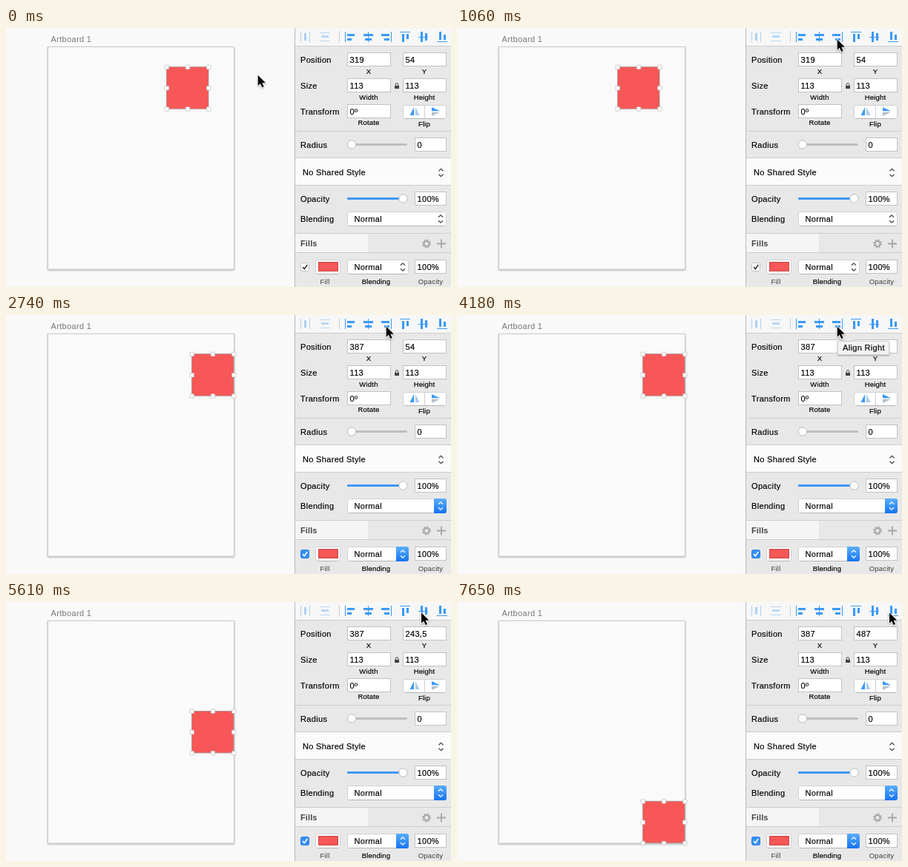
An HTML page for the animation above (8 s loop, 600 px wide and 350 px high).

```html
<!DOCTYPE html>
<html lang="en">
<head>
<meta charset="utf-8">
<title>Align tools</title>
<style>
html, body { margin: 0; width: 100%; height: 100%; overflow: hidden; background: #f9f9f9; }
svg { display: block; }
text { font: 11px "Liberation Sans", Arial, sans-serif; letter-spacing: .33px; fill: #000; stroke: #000; stroke-width: .18; white-space: pre; }
.small { font-size: 9.5px; letter-spacing: .2px; text-anchor: middle; }
.heading { font-weight: bold; fill: #444; stroke: none; letter-spacing: .1px; }
.muted { fill: #777; stroke: none; }
.dim { fill: #3c3c3c; stroke: none; }
.line { stroke: #cdcdcd; }
.box { fill: #fff; stroke: #c2c2c2; }
.button { fill: #fff; stroke: #d0d0d0; }
.knob { fill: #fdfdfd; stroke: #bdbdbd; }
.chevron { fill: none; stroke: #484848; stroke-width: 1.3; }
.cap { fill: url(#blue); visibility: hidden; }
.check { fill: none; stroke: #333; stroke-width: 1.6; }
.active .cap { visibility: visible; }
.active .cap + .chevron, .active .check { stroke: #fff; }
.active .tick { fill: #3390f8; stroke: #2b7fe0; }
.icon { fill: #3b99f5; }
.icon.pressed { fill: #16324f; }
</style>
</head>
<body>
<svg id="stage" width="600" height="350" viewBox="0 0 600 350"></svg>
<script>
const stage = document.getElementById('stage');
const LOOP = 8000;

const rect = (x, y, w, h, attrs = '') => `<rect x="${x}" y="${y}" width="${w}" height="${h}" ${attrs}/>`;
const text = (x, y, s, attrs = '') => `<text x="${x}" y="${y}" ${attrs}>${s}</text>`;
const small = (x, y, s, cls = '') => text(x, y, s, `class="small ${cls}"`);
const path = (d, attrs = '') => `<path d="${d}" ${attrs}/>`;
const field = (x, y, w, value, id) =>
  rect(x + .5, y + .5, w - 1, 18, 'class="box"') + text(x + 3.5, y + 14, value, id ? `id="${id}"` : '');
const button = (x, y, w, h) =>
  rect(x + .5, y + .5, w - 1, h - 1, 'rx="3" class="button"') +
  path(`M${x + 3} ${y + h - .5}h${w - 6}`, 'stroke="#b4b4b4"');
const rule = y => path(`M390 ${y + .5}H600`, 'class="line"');
const knob = (x, y) => `<circle cx="${x}" cy="${y}" r="5.7" class="knob"/>`;
const chevrons = (x, y) =>
  path(`M${x - 3} ${y - 2.2}l3 -3 3 3M${x - 3} ${y + 2.2}l3 3 3 -3`, 'class="chevron"');
const popup = (x, y, w) =>
  button(x, y, w, 20) +
  path(`M${x + w - 17} ${y}h14a3 3 0 0 1 3 3v14a3 3 0 0 1 -3 3h-14z`, 'class="cap"') +
  chevrons(x + w - 8, y + 10) + text(x + 9.5, y + 14, 'Normal');
// Each bar is [x, y, width, height]
const icon = (bars, attrs = '') =>
  `<g class="icon" ${attrs}>${bars.map(b => rect(...b)).join('')}</g>`;

function toolbar() {
  return rect(390, 0, 210, 24, 'fill="#f7f7f7"') + rule(24) +
    path('M449.5 4V20', 'class="line"') +
    icon([[397, 5, 1, 14], [402, 7, 3, 10], [409, 5, 1, 14]], 'opacity=".4"') +
    icon([[423, 6, 14, 1], [425, 10, 10, 3], [423, 17, 14, 1]], 'opacity=".32"') +
    icon([[457, 5, 1, 14], [460, 8, 10, 3], [460, 14, 6, 3]]) +
    icon([[488, 5, 1, 14], [482, 8, 13, 3], [484, 14, 9, 3]]) +
    icon([[519, 5, 1, 14], [506, 8, 11, 3], [510, 14, 7, 3]], 'id="right"') +
    icon([[531, 5, 14, 1], [534, 8, 3, 11], [540, 8, 3, 7]]) +
    icon([[556, 12, 13, 1], [559, 5, 3, 14], [565, 7, 3, 10]], 'id="middle"') +
    icon([[581, 18, 14, 1], [584, 5, 3, 11], [590, 9, 3, 7]], 'id="bottom"');
}

function geometry() {
  return text(397, 47, 'Position') + text(397, 82, 'Size') + text(397, 117, 'Transform') +
    field(460, 33, 59, '319', 'posX') + field(535, 33, 59, '54', 'posY') +
    field(460, 68, 59, '113') + field(535, 68, 59, '113') + field(460, 103, 59, '0º') +
    small(489, 62, 'X') + small(564, 62, 'Y') + small(489, 97, 'Width') +
    small(564, 97, 'Height') + small(489, 131, 'Rotate') + small(564, 133, 'Flip') +
    rect(524, 78, 6, 4, 'fill="#444"') +
    path('M525.2 78v-1.5a1.8 1.8 0 0 1 3.6 0V78', 'fill="none" stroke="#444"') +
    button(535, 104, 59, 19) + path('M564.5 105V122', 'class="line"') +
    path('M550 107V118H544.5z', 'fill="#3b99f5"') + path('M552 107V118H557.5z', 'fill="#a9cbee"') +
    path('M574 107V112.3H585z', 'fill="#3b99f5"') + path('M574 119V113.8H585z', 'fill="#b4c0cc"') +
    rule(139) + text(397, 162, 'Radius') +
    rect(462, 156, 79, 3, 'rx="1.5" fill="#bfbfbf"') + knob(466, 157.5) + field(551, 148, 43, '0');
}

function style() {
  return rect(390, 176, 210, 37, 'fill="#fbfbfb"') + rule(175) + rule(212) +
    text(400, 199, 'No Shared Style') + chevrons(586.5, 195.5) +
    text(397, 235, 'Opacity') + rect(460, 229, 75, 3, 'rx="1" fill="#3f98f5"') +
    knob(535.5, 230.5) + field(551, 221, 43, '100%') +
    text(397, 262, 'Blending') + popup(460, 248, 134);
}

function fills() {
  return rect(390, 278, 98, 25, 'fill="#f5f5f5"') + rule(277) + rule(303) +
    text(397, 295, 'Fills', 'class="heading"') +
    '<circle cx="567" cy="291.5" r="3.5" fill="none" stroke="#a6a6a6" stroke-width="2"/>' +
    '<circle cx="567" cy="291.5" r="5.2" fill="none" stroke="#a6a6a6" stroke-width="1.6" stroke-dasharray="2.1 1.98"/>' +
    path('M581 291.5h12M587 285.5v12', 'stroke="#a6a6a6" stroke-width="1.8"') +
    rect(397.5, 317.5, 11, 11, 'rx="2" class="box tick"') +
    path('M400 323l2.3 2.6 4 -5.6', 'class="check"') +
    button(417, 313, 34, 20) +
    rect(421.5, 316.5, 26, 12, 'fill="#f85757" stroke="#cb4545"') +
    popup(460, 313, 83) + field(551, 313, 43, '100%') +
    small(430, 346, 'Fill', 'dim') + small(499, 346, 'Blending') + small(572.5, 346, 'Opacity', 'dim');
}

function shape() {
  const size = 56.5;
  let handles = '';
  for (const i of [0, .5, 1]) for (const j of [0, .5, 1])
    if (i !== .5 || j !== .5)
      handles += rect(i * size - 2.5, j * size - 2.5, 5.5, 5.5,
        'rx=".8" fill="#fff" stroke="#b9b9b9" stroke-width=".7"');
  return `<g id="shape">${rect(0, 0, size, size, 'fill="#f75757" stroke="#a09090" stroke-width=".8"')}${handles}</g>`;
}

stage.innerHTML = `<defs>
  <linearGradient id="blue" x2="0" y2="1"><stop stop-color="#5aaefa"/><stop offset="1" stop-color="#1673f2"/></linearGradient>
  <filter id="shadow" x="-20%" y="-20%" width="150%" height="150%">
    <feDropShadow dx="0" dy="1" stdDeviation="1.3" flood-opacity=".35"/></filter>
  </defs>` +
  rect(0, 0, 600, 350, 'fill="#f9f9f9"') +
  text(60.5, 19, 'Artboard 1', 'class="muted"') +
  rect(56.5, 25.5, 251, 300.5, 'fill="#fafafa" stroke="#c4c4c4" stroke-width=".8" filter="url(#shadow)"') +
  shape() +
  rect(390, 0, 210, 350, 'fill="#e8e8e8"') + path('M389.5 0V350', 'stroke="#b9b9b9"') +
  toolbar() + geometry() + style() + fills() +
  `<g id="tip">${rect(.5, 35.5, 69, 18, 'id="tipBox" fill="#f3f3f3" stroke="#cfcfcf" stroke-width=".8" filter="url(#shadow)"')}
   ${text(7, 48, '', 'id="tipText"')}</g>` +
  path('M0 0V14.2L3.2 11.2 5.5 16.6 8 15.5 5.7 10.3H10.2Z',
    'id="cursor" stroke="#fff" stroke-width="1.6" stroke-linejoin="round" paint-order="stroke" filter="url(#shadow)"');

const el = id => document.getElementById(id);
const between = (t, a, b) => t >= a && t < b;

// The pointer advances in discrete, eased steps
const moves = [
  { start: 240, step: 117, count: 8, from: [339.7, 63.7], to: [512.7, 15.5] },
  { start: 4300, step: 117, count: 5, from: [512.7, 15.5], to: [560, 14.5] },
  { start: 6930, step: 120, count: 4, from: [560, 14.5], to: [583, 14.5] },
];
const presses = { right: 2620, middle: 5490, bottom: 7530 };

function pointer(t) {
  let at = moves[0].from;
  for (const { start, step, count, from, to } of moves) {
    if (t < start) break;
    const p = Math.min(count, 1 + Math.floor((t - start) / step)) / count;
    const eased = p * p * (3 - 2 * p);
    at = from.map((v, i) => v + (to[i] - v) * eased);
  }
  return at;
}

function showTip(x, label, width) {
  el('tip').setAttribute('visibility', label ? 'visible' : 'hidden');
  if (!label) return;
  el('tip').setAttribute('transform', `translate(${x} 0)`);
  el('tipBox').setAttribute('width', width);
  el('tipText').textContent = label;
}

function draw(t) {
  const x = t < 2740 ? 319 : 387;
  const y = t < 5610 ? 54 : t < 7650 ? 243.5 : 487;
  el('posX').textContent = x;
  el('posY').textContent = String(y).replace('.', ',');
  el('shape').setAttribute('transform', `translate(${57 + x / 2} ${25.7 + y / 2})`);
  el('cursor').setAttribute('transform', `translate(${pointer(t)})`);
  stage.classList.toggle('active', t >= presses.right);
  for (const id in presses)
    el(id).classList.toggle('pressed', between(t, presses[id], presses[id] + 120));
  if (between(t, 4180, 4420)) showTip(513, 'Align Right', 69);
  else if (between(t, 4770, 5490)) showTip(560.5, 'Align Vertically', 90);
  else showTip();
}

function frame() {
  draw(performance.now() % LOOP);
  requestAnimationFrame(frame);
}
frame();
</script>
</body>
</html>
```
